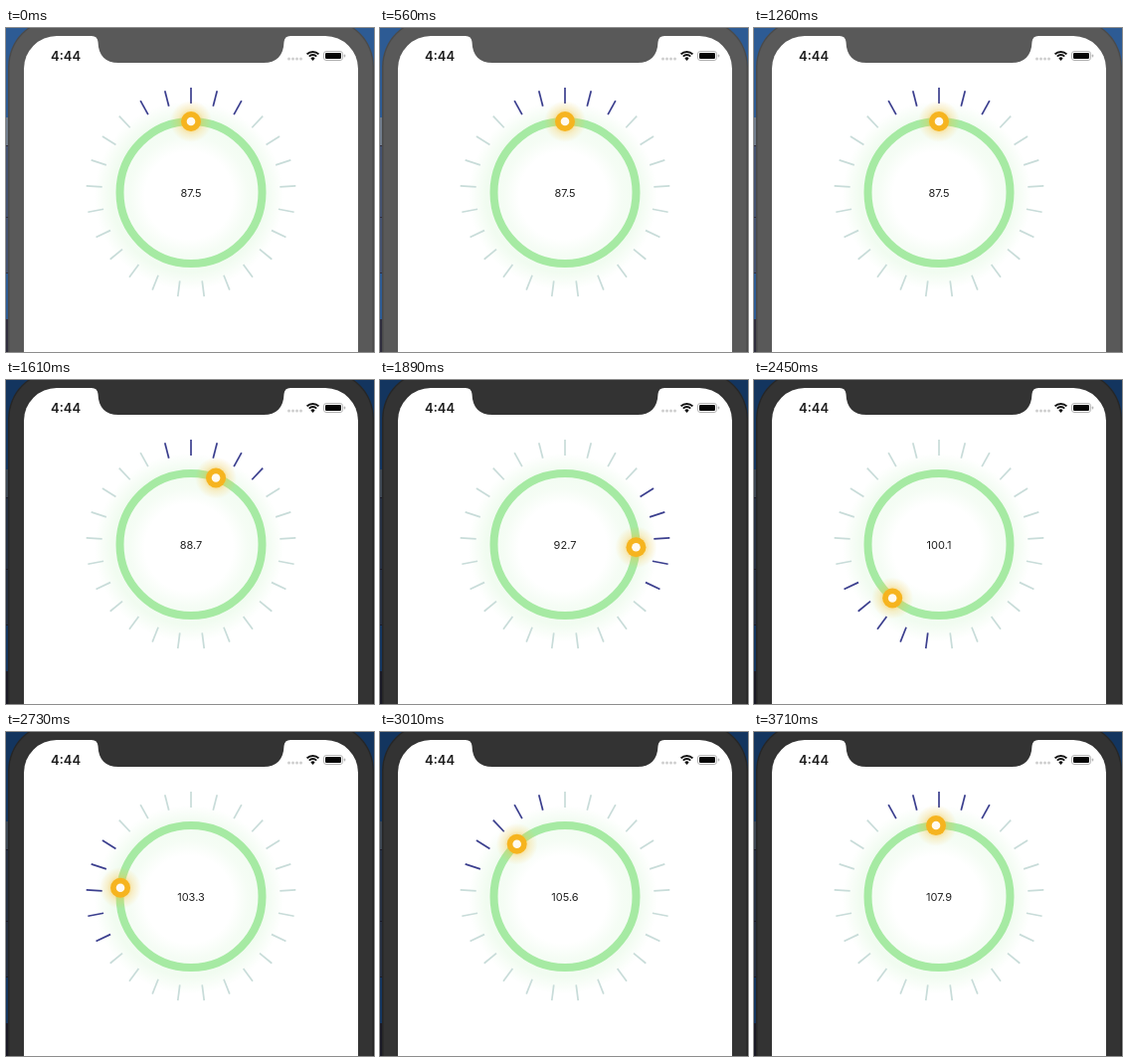
Recreate the animation shown at these times as an HTML page with a canvas. Size 370 px wide and 326 px high, loop 4.13 s.

```html
<!DOCTYPE html>
<html lang="en">
<head>
<meta charset="utf-8">
<title>Radio dial</title>
<style>
  html, body { margin: 0; width: 100%; height: 100%; overflow: hidden; background: #fff; }
  canvas { display: block; width: 370px; height: 326px; }
</style>
</head>
<body>
<canvas id="stage" width="370" height="326"></canvas>
<script>
const ctx = document.getElementById('stage').getContext('2d');
const LOOP = 4130, STEP = 70, TAU = Math.PI * 2;
const CX = 186, CY = 165.5, RING = 71.5;
const TICKS = 25, TICK_ANGLE = 360 / TICKS;
const MIN_FREQ = 87.5, FREQ_SPAN = 20.5;

// Knob angle in degrees over time in ms
const ANGLE_KEYS = [
  [1470, 0], [1540, 6], [1610, 20.5], [2030, 128], [2100, 148.8], [2240, 182],
  [2450, 220.9], [2590, 253], [2730, 277], [3010, 317.5], [3150, 341],
  [3220, 349], [3290, 354], [3430, 357.6]
];
const FADE_KEYS = [[1260, 0], [1400, 1]];

function valueAt(keys, t) {
  if (t <= keys[0][0]) return keys[0][1];
  for (let i = 1; i < keys.length; i++) {
    const [t0, v0] = keys[i - 1], [t1, v1] = keys[i];
    if (t <= t1) return v0 + (v1 - v0) * (t - t0) / (t1 - t0);
  }
  return keys[keys.length - 1][1];
}

function mix(a, b, k) {
  return `rgb(${a.map((v, i) => Math.round(v + (b[i] - v) * k)).join(',')})`;
}

function polar(degrees, radius) {
  const a = degrees * Math.PI / 180;
  return [CX + Math.sin(a) * radius, CY - Math.cos(a) * radius];
}

function disc(x, y, r, fill) {
  ctx.fillStyle = fill;
  ctx.beginPath();
  ctx.arc(x, y, r, 0, TAU);
  ctx.fill();
}

function box(x, y, w, h, r, fill) {
  ctx.fillStyle = fill;
  ctx.beginPath();
  ctx.roundRect(x, y, w, h, r);
  ctx.fill();
}

function label(text, x, y, font, align, color) {
  ctx.font = font;
  ctx.textAlign = align;
  ctx.fillStyle = color;
  ctx.fillText(text, x, y);
}

function drawDesktop(dim) {
  ctx.fillStyle = mix([45, 91, 148], [19, 53, 95], dim);
  ctx.fillRect(0, 0, 370, 326);
  ctx.fillStyle = mix([112, 124, 140], [60, 70, 82], dim);
  ctx.fillRect(0, 90, 3, 28);
  ctx.fillStyle = mix([68, 82, 112], [38, 48, 66], dim);
  ctx.fillRect(0, 119, 3, 127);
  ctx.fillStyle = mix([48, 46, 62], [26, 26, 38], dim);
  for (const y of [118, 190, 246]) ctx.fillRect(0, y, 3, 1);
  ctx.fillRect(0, 293, 3, 33);
}

function drawPhone(dim) {
  const bezel = mix([89, 89, 89], [51, 51, 51], dim);
  box(2, -9, 368, 400, 48, mix([74, 74, 74], [38, 38, 38], dim));
  box(3.5, -7.5, 365, 400, 46, bezel);
  box(18, 8, 336, 400, 33, '#fff');

  ctx.fillStyle = bezel;
  ctx.beginPath();
  ctx.moveTo(86, 7);
  ctx.lineTo(86, 8);
  ctx.quadraticCurveTo(92, 8, 92.5, 14);
  ctx.bezierCurveTo(93, 28, 100, 35, 113, 35);
  ctx.lineTo(259, 35);
  ctx.bezierCurveTo(272, 35, 279, 28, 279.5, 14);
  ctx.quadraticCurveTo(280, 8, 286, 8);
  ctx.lineTo(286, 7);
  ctx.fill();
}

function drawStatus() {
  label('4:44', 45, 33, '600 13px Inter, sans-serif', 'left', '#1c1c1c');
  for (let i = 0; i < 4; i++) disc(284.5 + i * 4, 31, 1.5, '#cfcfcf');

  ctx.strokeStyle = '#111';
  ctx.lineWidth = 2;
  for (const r of [8.4, 5.2]) {
    ctx.beginPath();
    ctx.arc(308.5, 32.3, r, -Math.PI * .75, -Math.PI * .25);
    ctx.stroke();
  }
  ctx.fillStyle = '#111';
  ctx.beginPath();
  ctx.moveTo(308.5, 33);
  ctx.arc(308.5, 32.5, 3, -Math.PI * .75, -Math.PI * .25);
  ctx.fill();

  ctx.strokeStyle = '#b5b5b5';
  ctx.lineWidth = 1;
  ctx.beginPath();
  ctx.roundRect(319.5, 23.5, 19, 9, 2.5);
  ctx.stroke();
  box(321, 25, 16, 6, 1.3, '#050505');
  box(339.8, 26.5, 1.4, 3, .7, '#b5b5b5');
}

function drawTicks(angle) {
  const nearest = Math.round(angle / TICK_ANGLE);
  for (let i = 0; i < TICKS; i++) {
    const gap = (i - nearest + TICKS * 2) % TICKS;
    const active = Math.min(gap, TICKS - gap) <= 2;
    ctx.strokeStyle = active ? '#3b3f8e' : '#c8dcd9';
    ctx.lineWidth = 1.7;
    ctx.beginPath();
    ctx.moveTo(...polar(i * TICK_ANGLE, 89.5));
    ctx.lineTo(...polar(i * TICK_ANGLE, 105.5));
    ctx.stroke();
  }
}

function drawRing() {
  const glow = ctx.createRadialGradient(CX - 2, CY + 3, 44, CX - 2, CY + 3, 95);
  glow.addColorStop(0, 'rgba(166,234,162,0)');
  glow.addColorStop(.3, 'rgba(166,234,162,.11)');
  glow.addColorStop(.65, 'rgba(166,234,162,.16)');
  glow.addColorStop(1, 'rgba(166,234,162,0)');
  disc(CX - 2, CY + 3, 95, glow);

  ctx.strokeStyle = '#a6eaa3';
  ctx.lineWidth = 8;
  ctx.beginPath();
  ctx.arc(CX, CY, RING, 0, TAU);
  ctx.stroke();
}

function drawKnob(angle) {
  const [x, y] = polar(angle, RING);
  const glow = ctx.createRadialGradient(x, y, 8, x, y, 21);
  glow.addColorStop(0, 'rgba(250,190,50,.5)');
  glow.addColorStop(.4, 'rgba(250,190,50,.22)');
  glow.addColorStop(1, 'rgba(250,190,50,0)');
  disc(x, y, 21, glow);
  disc(x, y, 10, '#f6b41f');
  disc(x, y, 4.3, '#fffaf0');
}

function draw(t) {
  const angle = valueAt(ANGLE_KEYS, t);
  const dim = valueAt(FADE_KEYS, t);
  const frequency = MIN_FREQ + angle / 360 * FREQ_SPAN;
  drawDesktop(dim);
  drawPhone(dim);
  drawStatus();
  drawRing();
  drawTicks(angle);
  drawKnob(angle);
  label(String(Math.round(frequency * 10) / 10), CX, 170,
    '11px Inter, sans-serif', 'center', '#222');
}

const start = performance.now();
function tick() {
  const t = (performance.now() - start) % LOOP;
  draw(Math.floor(t / STEP) * STEP);
  requestAnimationFrame(tick);
}
tick();
</script>
</body>
</html>
```
